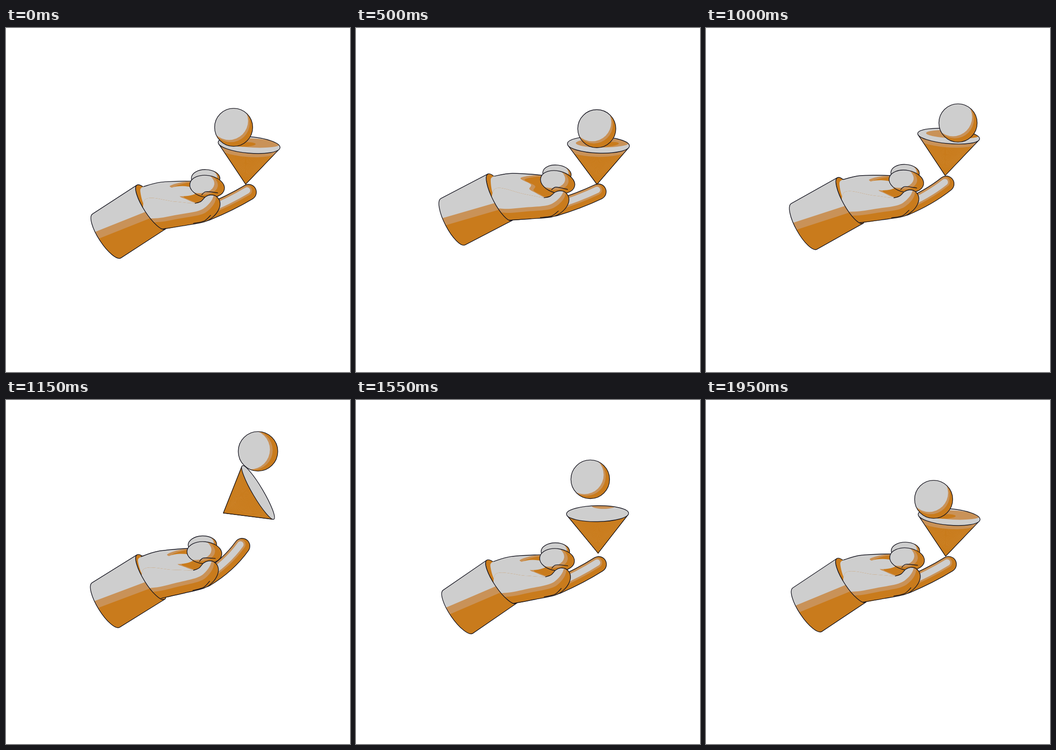
Recreate the animation shown at these times as an HTML page with a canvas. Size 748 by 748 pixels, loop 2000 ms.

```html
<!DOCTYPE html>
<html lang="en">
<head>
<meta charset="utf-8">
<title>Balancing hand</title>
<style>
html, body { margin: 0; width: 100%; height: 100%; overflow: hidden; background: #fff; }
canvas { display: block; width: 100vw; height: 100vh; }
</style>
</head>
<body>
<canvas id="stage" width="748" height="748"></canvas>
<script>
const ctx = document.getElementById('stage').getContext('2d');
const GREY = '#cecece', TAN = '#c99258', ORANGE = '#c97b1c', INK = '#14141f';
const LOOP = 2000, STEP = 50;
const LIGHT = [.2, -.8, .57];

// Key points of the only free-form outlines.
const PALM = [[301, 322], [340, 316], [405, 320], [440, 345], [420, 395], [335, 408], [303, 375], [293, 335]];
const PATCH = [[358, 326], [404, 321], [425, 345], [432, 358], [414, 369], [388, 357], [377, 350], [380, 340]];
const THUMB = [[409, 369], [422, 366], [433, 357], [444, 354], [456, 358], [463, 371], [459, 387], [445, 402], [425, 411], [380, 415], [331, 418]];
const WEB = [[300, 408], [302, 350], [365, 361]];

const clamp = v => Math.max(0, Math.min(1, v));
const mix = (a, b, k) => a + (b - a) * k;

function ease(t, from, to) {
  const k = clamp((t - from) / (to - from));
  return k * k * (3 - 2 * k);
}

function curve(pts, closed = true) {
  const path = new Path2D(), n = pts.length;
  const at = i => pts[closed ? (i + n) % n : Math.max(0, Math.min(n - 1, i))];
  path.moveTo(...pts[0]);
  for (let i = 0; i < (closed ? n : n - 1); i++) {
    const [a, b, c, d] = [at(i - 1), at(i), at(i + 1), at(i + 2)];
    path.bezierCurveTo(b[0] + (c[0] - a[0]) / 6, b[1] + (c[1] - a[1]) / 6,
      c[0] - (d[0] - b[0]) / 6, c[1] - (d[1] - b[1]) / 6, ...c);
  }
  return path;
}

function oval(x, y, rx, ry, turn = 0) {
  const path = new Path2D();
  path.ellipse(x, y, rx, ry, turn, 0, 7);
  return path;
}

function fill(path, color, dx = 0, dy = 0) {
  ctx.save();
  ctx.translate(dx, dy);
  ctx.fillStyle = color;
  ctx.fill(path);
  ctx.restore();
}

function line(path, color = INK, width = 1.4) {
  ctx.strokeStyle = color;
  ctx.lineWidth = width;
  ctx.stroke(path);
}

function group(draw) {
  ctx.save();
  draw();
  ctx.restore();
}

function inside(path, draw) {
  group(() => { ctx.clip(path); draw(); });
}

function rotateAbout(x, y, angle) {
  ctx.translate(x, y);
  ctx.rotate(angle);
  ctx.translate(-x, -y);
}

// Lit areas are the outline itself, moved towards the light.
function shade(path, dx, dy, edge = path) {
  fill(path, ORANGE);
  inside(path, () => {
    fill(path, TAN, dx * .65, dy * .65);
    fill(path, GREY, dx, dy);
  });
  line(edge);
}

function drawPointer(bend) {
  const path = new Path2D();
  path.moveTo(432, 392);
  path.quadraticCurveTo(485, 376 - 6 * bend, 527 - 6 * bend, 356 - 25 * bend);
  line(path, INK, 35.4);
  line(path, ORANGE, 32.6);
  ctx.translate(-3, -4);
  line(path, TAN, 22);
  line(path, GREY, 14);
}

function drawPalm(open) {
  const palm = curve(PALM), patch = curve(PATCH);
  fill(palm, GREY);
  fill(patch, TAN);
  inside(patch, () => fill(patch, ORANGE, 9, 3));
  fill(oval(384, 340, 32, 11 * open, .1), GREY);
  line(curve(PALM.slice(0, 3), false));
}

function drawFingers(bend, open) {
  rotateAbout(300, 395, -.09 * bend);
  group(() => drawPointer(bend));
  shade(oval(437, 317, 31, 19, .12), -6, -4);
  drawPalm(open);
  shade(oval(438.5, 335, 38, 24, .25), -21, -12);
  line(curve([[425, 352], [435, 346], [460, 351]], false));
  shade(curve([...THUMB, ...WEB]), -11, -25, curve(THUMB, false));
  line(curve([[401, 412], [425, 409], [440, 398]], false));
}

function drawSleeve(wrist) {
  const tube = new Path2D();
  tube.ellipse(0, 0, 16, 57, 0, -Math.PI / 2, Math.PI / 2, true);
  tube.ellipse(-115, 0, 18, 57, 0, Math.PI / 2, Math.PI * 1.5);
  tube.closePath();
  const below = y => {
    const path = new Path2D();
    path.moveTo(-150, y - 30);
    path.lineTo(50, y + 10);
    path.lineTo(50, 200);
    path.lineTo(-150, 200);
    return path;
  };
  fill(tube, GREY);
  inside(tube, () => {
    fill(below(9 - 5 * wrist), TAN);
    fill(below(26 - 5 * wrist), ORANGE);
  });
  line(tube);
}

// The arm swings around the tip of the pointing finger.
function drawArm(wrist, bend) {
  const forearm = draw => group(() => {
    ctx.translate(313, 368);
    ctx.rotate(-.48);
    draw();
  });
  rotateAbout(538, 352, -.122 * wrist);
  forearm(() => {
    const cuff = oval(0, 0, 16, 57);
    fill(cuff, ORANGE);
    line(cuff);
  });
  group(() => drawFingers(bend, clamp(3 * (wrist + bend))));
  forearm(() => drawSleeve(wrist));
}

function tone(normal) {
  const d = normal.reduce((sum, v, i) => sum + v * LIGHT[i], 0);
  return d < .2 ? ORANGE : d < .55 ? TAN : GREY;
}

function drawCone(px, py, turn, depth, ball) {
  const c = Math.cos(turn), s = Math.sin(turn), radius = 67.5;
  const height = 89.5 - 3.5 * c, x = px + 30 * s, y = py - 30 * c;
  const apex = [x - s * height, y + c * height];
  const axis = [-s * .96, c * .96, -.28], near = [-s * .28, c * .28, .96], side = [c, s, 0];
  const rim = f => {
    const u = radius * Math.cos(f), v = depth * Math.sin(f);
    return [x + c * u - s * v, y + s * u + c * v];
  };
  const wedge = (from, to) => {
    const path = new Path2D();
    path.moveTo(...rim(from));
    path.lineTo(...apex);
    path.lineTo(...rim(to));
    return path;
  };
  const start = Math.asin(depth / height), slices = 60, step = (Math.PI - 2 * start) / slices;
  for (let i = 0; i < slices; i++) {
    const f = start + i * step, m = f + step / 2, slice = wedge(f, f + step);
    const color = tone(side.map((v, k) =>
      .8 * (v * Math.cos(m) + near[k] * Math.sin(m)) + .6 * axis[k]));
    fill(slice, color);
    line(slice, color, .7);
  }

  const body = wedge(start, Math.PI - start), disc = oval(x, y, radius, depth, turn);
  const upright = c > .9, loaded = upright && ball.y + 61 > y;
  if (loaded) inside(body, () => fill(disc, TAN, -5, 8));
  line(body);
  fill(disc, tone(axis.map(v => -v)));
  inside(disc, () => {
    if (loaded) {
      fill(oval(x + 9, y - 4, 58, depth * .55, turn - .04), TAN);
      fill(oval(ball.x + 23, y - 1, 25, 5, turn - .12), ORANGE);
    } else if (upright) {
      fill(oval(x + 13, y - depth, 26, 7), TAN);
    }
  });
  line(disc);
}

function drawBall({ x, y }, hop) {
  const r = 41.4 + 2 * hop;
  shade(oval(x, y, r, r), mix(-10, -19, hop), mix(-14, -1, hop));
}

function draw(t) {
  const swing = at => ease(at, 1830, 2400);
  const wrist = ease(t, 800, 1400) - swing(t) + 1 - swing(t + LOOP);
  const bend = ease(t, 830, 1230) - ease(t, 1300, 1530);
  const hop = ease(t, 940, 1240) - ease(t, 1240, 1740);
  const toss = ease(t, 900, 1200) - ease(t, 1250, 1620);
  const lean = 5 * (1 - ease(t, 0, 900) + ease(t, 880, 1000) - ease(t, 1300, 1500) + ease(t, 1550, 1800));
  const turn = (lean + 360 * ease(t, 1015, 1565)) * Math.PI / 180;
  const ball = {
    x: 495 + 53 * (ease(t, 0, 950) - ease(t, 1300, 1680)),
    y: 216 + 5 * (ease(t, 0, 900) - ease(t, 1300, 1700)) - 139.5 * hop
  };

  ctx.fillStyle = '#fff';
  ctx.fillRect(0, 0, 748, 748);
  ctx.lineJoin = ctx.lineCap = 'round';
  group(() => drawArm(wrist, bend));
  drawCone(526 - 4 * toss, 284 - 73 * toss, turn, 18 - 7 * toss, ball);
  drawBall(ball, hop);
}

const begin = performance.now();
function frame() {
  draw(Math.floor((performance.now() - begin) % LOOP / STEP) * STEP);
  requestAnimationFrame(frame);
}
frame();
</script>
</body>
</html>
```
